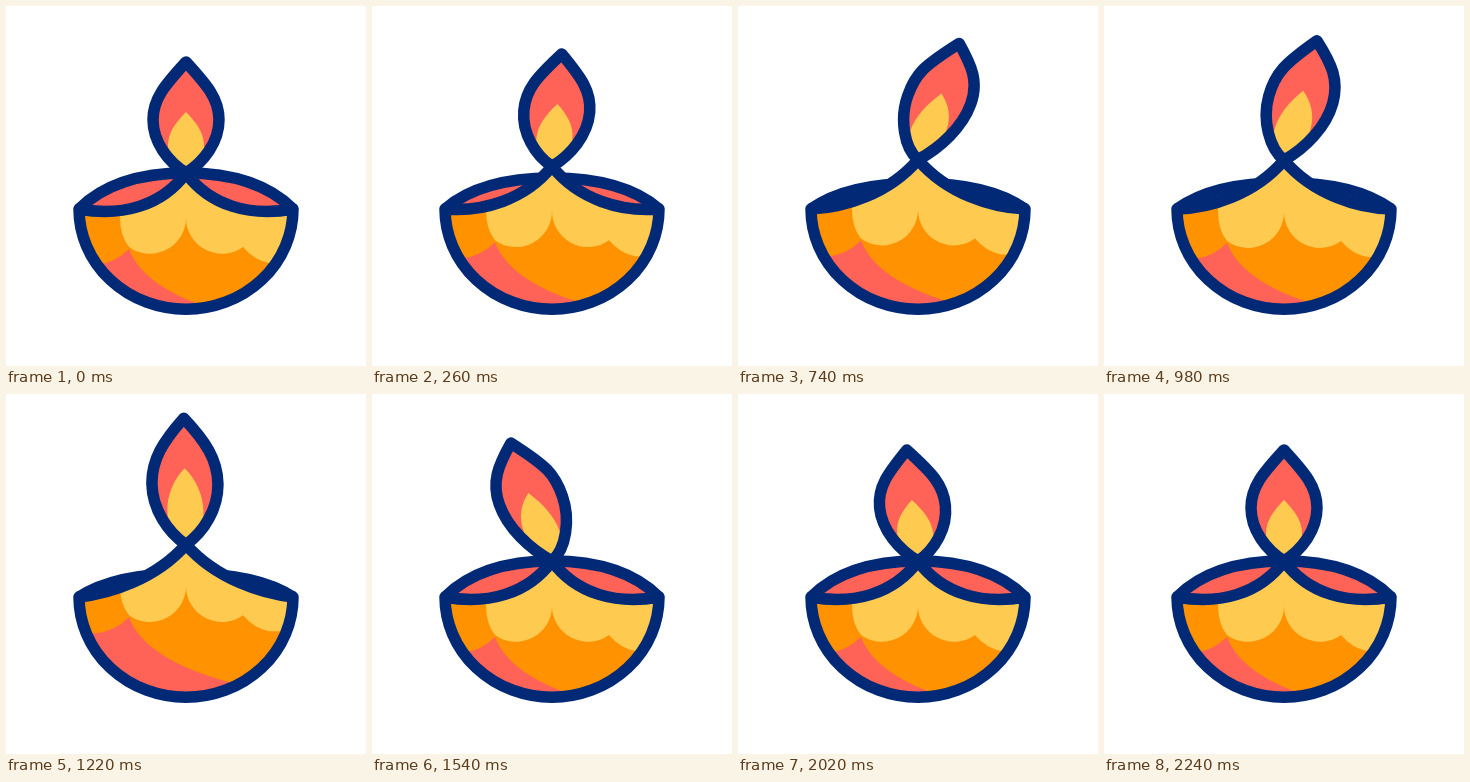
Recreate the animation shown at these times as an HTML page. Size 360 by 360 pixels, loop 2.4 s.

```html
<!DOCTYPE html>
<html lang="en">
<head>
<meta charset="utf-8">
<title>Oil lamp</title>
<style>
  html, body { margin: 0; width: 100%; height: 100%; overflow: hidden; background: #fff; }
  svg { display: block; width: 100%; height: 100%; }
  .line { fill: none; stroke: #022975; stroke-width: 11.5; stroke-linejoin: round; }
  .red { fill: #ff6256; }
  .orange { fill: #ff9200; }
  .yellow { fill: #ffca50; }
</style>
</head>
<body>
<svg viewBox="0 0 360 360">
  <defs>
    <clipPath id="bowlClip"><path data-d="bowl"/></clipPath>
    <clipPath id="flameClip"><path data-d="flame"/></clipPath>
  </defs>
  <path class="red" data-d="rear"/>
  <path class="line" data-d="rear"/>
  <g clip-path="url(#bowlClip)">
    <path class="red" data-d="bowl"/>
    <path class="orange" data-d="patch"/>
    <path class="orange" data-d="belly"/>
    <path class="yellow" data-d="scallops"/>
  </g>
  <path class="line" data-d="bowl"/>
  <path class="red" data-d="flame"/>
  <path class="yellow" data-d="core" clip-path="url(#flameClip)"/>
  <path class="line" data-d="flame"/>
</svg>
<script>
const LOOP = 2400, REST = 2240;
const LEFT = 73, MID = 180, RIGHT = 287, RIM = 203;

// Cosine easing through a few [ms, value] poses
function glide(t, ...poses) {
  const i = poses.findIndex(p => p[0] > t);
  if (i < 0) return poses[poses.length - 1][1];
  const [t0, a] = poses[i - 1], [t1, b] = poses[i];
  return a + (b - a) * (1 - Math.cos(Math.PI * (t - t0) / (t1 - t0))) / 2;
}

// Two puffs; the second is stronger and ends in a quick drop
const puffs = (t, first, dip, second, end = 1520) =>
  glide(t, [0, 0], [560, first], [900, dip], [1200, second], [end, 0]);

function flamePaths(base, lean, height) {
  // x from the axis, h above the base, sheared by the lean
  const at = (x, h) => `${MID + x + lean * h},${base - h}`;
  const loop = side => {
    const [tip, ...down] = side(-1), up = side(1).reverse().slice(1);
    return `M${tip}C${down.join(" ")}C${up.join(" ")}Z`;
  };
  const outer = s => {
    const trail = Math.max(0, -s * lean);
    const level = f => height * (f + .2 * trail);
    return [at(0, height), at(s * (21 + 20 * trail), height - 23), at(s * 33, level(.67)),
      at(s * 33, level(.48)), at(s * 33, level(.28)), at(s * 18, height * .1), at(0, 0)];
  };
  const core = height - 50;
  const inner = s => [at(0, core), at(s * 11, core - 11), at(s * 18, core * .65),
    at(s * 18, core * .45), at(s * 18, core * .2), at(s * 8, 0), at(0, 0)];
  return { flame: loop(outer), core: loop(inner) };
}

function bowlPaths(lift, wave) {
  const sink = lift * .76, apex = 167 + sink, shoulder = 176 + sink * .75;
  const far = 42 - lift * .7, farY = 211 - lift * .7;
  const near = 24 + lift * .4, nearY = 200 - lift * .9;
  const y = v => v - wave;
  return {
    rear: `M${LEFT},${RIM}C100,${shoulder} 140,${apex} ${MID},${apex}S260,${shoulder} ${RIGHT},${RIM}`,
    bowl: `M${LEFT},${RIM}C${LEFT + far},${farY} ${MID - near},${nearY} ${MID},${167 - lift}` +
      `C${MID + near},${nearY} ${RIGHT - far},${farY} ${RIGHT},${RIM}A107,100.3 0 0 1 ${LEFT},${RIM}Z`,
    patch: `M60,140H125L123,${y(243)}Q109,${y(257)} 90,${y(259)}H60Z`,
    belly: `M123,${y(243)}Q140,${y(288)} 235,${y(311)}L300,320V140H118Z`,
    scallops: `M114,140V${y(211)}Q114,${y(230)} 123,${y(241)}A36,36 0 0 0 ${MID},${y(211)}` +
      `A36,36 0 0 0 237,${y(241)}Q248,${y(254)} 263,${y(257)}H300V140Z`
  };
}

const nodes = [...document.querySelectorAll("[data-d]")];

function draw(now) {
  const t = Math.min(now % LOOP, REST);
  const lift = puffs(t, 15, 12, 16.5);
  const wave = puffs(t, 15, 3, 20);
  const height = 111 + puffs(t, 3, 7, 15.5, 1840);
  const lean = glide(t, [0, 0], [800, .36], [1620, -.365], [REST, 0]);
  const d = { ...bowlPaths(lift, wave), ...flamePaths(167 - lift, lean, height) };
  for (const n of nodes) n.setAttribute("d", d[n.dataset.d]);
}

const start = performance.now();
function tick() {
  draw(performance.now() - start);
  requestAnimationFrame(tick);
}
tick();
</script>
</body>
</html>
```
